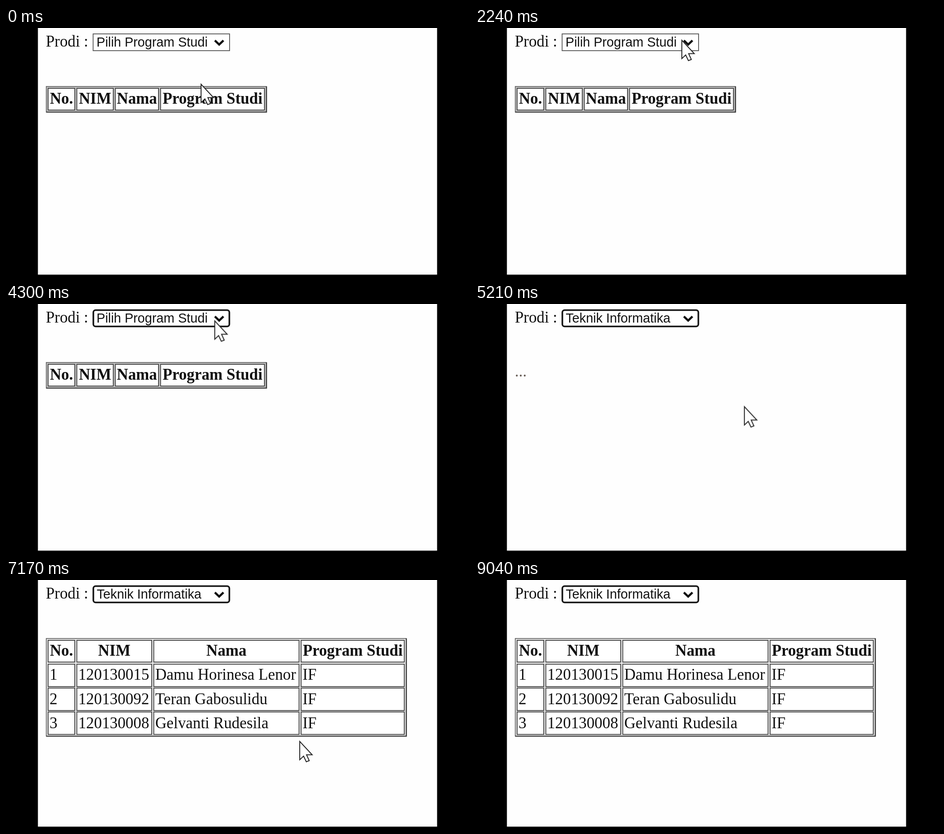
An HTML page for the animation above (9.07 s loop, 1023 px wide and 547 px high).

```html
<!DOCTYPE html>
<html lang="id">
<head>
<meta charset="utf-8">
<title>Prodi</title>
<style>
html, body { margin: 0; width: 100%; height: 100%; overflow: hidden; background: #000; }
svg { display: block; width: 100%; height: 100%; }
text { font: 34.8px "Liberation Serif", "Times New Roman", serif; fill: #111; white-space: pre; }
.head { font-weight: bold; }
.option { font: 28.7px "Liberation Sans", Arial, sans-serif; }
.cell { fill: #fff; stroke: #424242; stroke-width: 1.9; }
.timed { animation: 9070ms step-end infinite; }
#plain-box { animation-name: plain-box; }
#focus-box { animation-name: focus-box; }
#prompt, #empty { animation-name: before-choice; }
#choice { animation-name: after-choice; }
#loading { animation-name: loading; fill: #665c55; }
#result { animation-name: result; }
#cursor { animation: move 9070ms ease-in-out infinite, vanish 9070ms step-end infinite; }

@keyframes plain-box { 0% { opacity: 1 } 43.8%, 100% { opacity: 0 } }
@keyframes focus-box { 0% { opacity: 0 } 43.8%, 100% { opacity: 1 } }
@keyframes before-choice { 0% { opacity: 1 } 51.7%, 100% { opacity: 0 } }
@keyframes after-choice { 0% { opacity: 0 } 51.7%, 100% { opacity: 1 } }
@keyframes loading { 0% { opacity: 0 } 51.7% { opacity: 1 } 59.6%, 100% { opacity: 0 } }
@keyframes result { 0% { opacity: 0 } 59.6%, 100% { opacity: 1 } }
@keyframes vanish { 0% { opacity: 1 } 87.1%, 100% { opacity: 0 } }
@keyframes move {
  0%, 9.9% { transform: translate(431px, 124px) }
  18.7% { transform: translate(443px, 88px) }
  24.2%, 27.6% { transform: translate(457px, 27px) }
  35.9%, 38% { transform: translate(440px, 92px) }
  43%, 46.3% { transform: translate(460px, 30px) }
  51.3% { transform: translate(472px, 100px); animation-timing-function: linear }
  57.44% { transform: translate(595px, 226px); animation-timing-function: ease-out }
  61.3% { transform: translate(632px, 299px) }
  67.37% { transform: translate(638px, 308px) }
  71.6%, 100% { transform: translate(649px, 356px) }
}
</style>
</head>
<body>
<svg viewBox="0 0 1023 547">
  <rect x="70.5" width="882" height="544" fill="#fefefe"/>
  <text x="88" y="41">Prodi :</text>

  <rect id="plain-box" class="timed" x="192.5" y="13" width="301.5" height="37" fill="#fff" stroke="#555" stroke-width="1.8"/>
  <rect id="focus-box" class="timed" x="193" y="13.5" width="300.5" height="36" rx="5" fill="#fff" stroke="#161616" stroke-width="3.6"/>
  <text id="prompt" class="option timed" x="200" y="41">Pilih Program Studi</text>
  <text id="choice" class="option timed" x="200.5" y="41">Teknik Informatika</text>
  <path d="M461.5 27.5 471 36.5 480.5 27.5" fill="none" stroke="#111" stroke-width="4.6"/>

  <g id="empty" class="timed"></g>
  <text id="loading" class="timed" x="88" y="160">...</text>
  <g id="result" class="timed"></g>

  <path id="cursor" d="M0 0V40.5L8.5 32.5 14.5 45 21 42.5 15 29.5H27.5Z" fill="#fff" stroke="#252525" stroke-width="2"/>
</svg>
<script>
const heads = ["No.", "NIM", "Nama", "Program Studi"];
const students = [
  ["1", "120130015", "Damu Horinesa Lenor", "IF"],
  ["2", "120130092", "Teran Gabosulidu", "IF"],
  ["3", "120130008", "Gelvanti Rudesila", "IF"]
];

function add(parent, tag, attributes, content = "") {
  const node = document.createElementNS(parent.namespaceURI, tag);
  for (const [key, value] of Object.entries(attributes)) node.setAttribute(key, value);
  node.textContent = content;
  parent.append(node);
}

// columns: [left, right] of each cell; gap: colour between the cells
function drawTable(id, columns, rows, gap) {
  const group = document.getElementById(id);
  const right = columns[3][1] + 4.5;
  const bottom = 132.5 + rows.length * 53;
  add(group, "rect", { x: 89, y: 129, width: right - 89, height: bottom - 129, fill: gap, stroke: "#686868", "stroke-width": 1.8 });
  add(group, "path", { d: `M89 ${bottom}H${right}V129`, fill: "none", stroke: "#383838", "stroke-width": 2.2 });
  rows.forEach((row, r) => row.forEach((label, c) => {
    const [x, end] = columns[c];
    const isHead = r === 0;
    add(group, "rect", { class: "cell", x, y: 133 + r * 52.7, width: end - x, height: isHead ? 48 : 49.5 });
    add(group, "text", {
      class: isHead ? "head" : "",
      x: isHead ? (x + end) / 2 : x + 3.2,
      y: 167 + r * 53.3,
      "text-anchor": isHead ? "middle" : "start"
    }, label);
  }));
}

drawTable("empty", [[93, 152], [156.5, 237], [241.5, 337], [341.5, 571]], [heads], "#c6c6c6");
drawTable("result", [[93, 152], [156.5, 322], [326.5, 647.5], [652, 880]], [heads, ...students], "#ececec");
</script>
</body>
</html>
```
